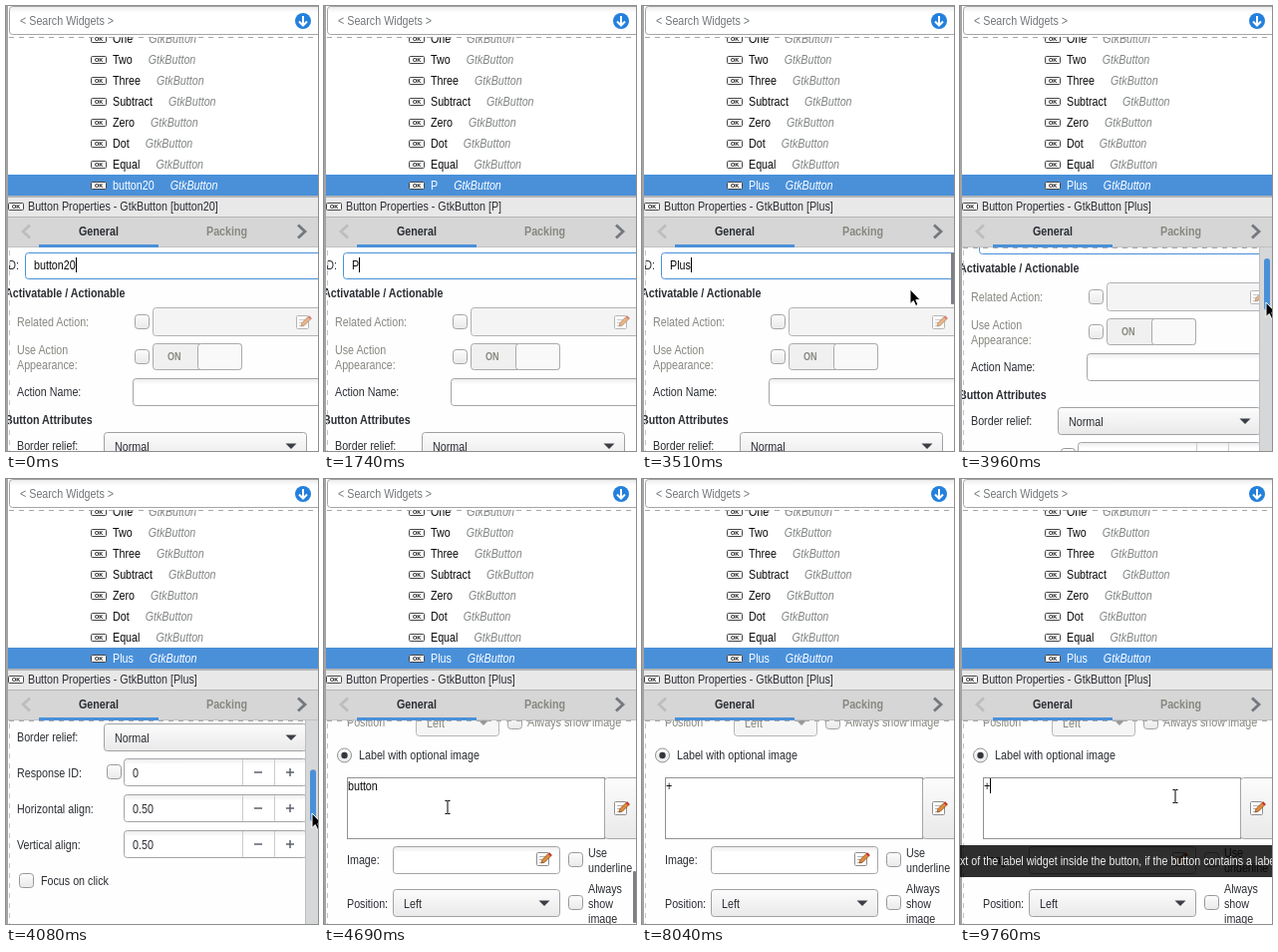
Write an HTML page that moves like this. It is 313x446 px and loops after 9.78 s.

```html
<!DOCTYPE html>
<html lang="en">
<head>
<meta charset="utf-8">
<title>Button properties</title>
<style>
html, body { margin: 0; width: 100%; height: 100%; overflow: hidden; background: #fff; }
svg { display: block; width: 100vw; height: 100vh; }
text { font: 13px "Liberation Sans", Arial, sans-serif; fill: #2b2e33; white-space: pre; }
.b { font-weight: bold; }
.dim { fill: #868880; }
.hint { fill: #73777a; }
.kind { font-style: italic; fill: #828586; }
.sel text, .sel .kind { fill: #fff; }
.ink { fill: #0a0a0a; }
</style>
</head>
<body>
<svg id="stage" viewBox="0 0 313 446"></svg>
<script>
const LOOP = 9780, SCROLL = 600, TRAVEL = 146, GRAB = 291;
const NARROW = 0.825; // one condensed face throughout
const BLUE = '#4a90d9', PAGE = '#fefefe', WELL = 'url(#well)';

const rect = (x, y, w, h, fill, more = '') =>
  `<rect x="${x}" y="${y}" width="${w}" height="${h}" fill="${fill}" ${more}/>`;
const box = (x, y, w, h, fill = WELL, line = '#a3a5a8', r = 3) =>
  rect(x + .5, y + .5, w - 1, h - 1, fill, `stroke="${line}" rx="${r}"`);
const path = (d, more) => `<path d="${d}" ${more}/>`;
const text = (x, y, s, cls = '', more = '') =>
  `<text class="${cls}" transform="translate(${x} ${y}) scale(${NARROW} 1)" ${more}>${s}</text>`;

const okIcon = (x, y) => box(x, y, 16, 8, '#fff', '#444', 1) +
  `<text x="${x + 8}" y="${y + 6}" text-anchor="middle" style="font-size:5.500px;font-weight:bold;fill:#111">OK</text>`;
const check = (x, y, off) => box(x, y, 15, 15, 'url(#face)', off ? '#a2a4a6' : '#96999c');
const down = (x, y, c = '#3b3f45') => path(`M${x - 5.5} ${y - 2.5}h11l-5.5 5.5z`, `fill="${c}"`);
const combo = (x, y, w, h, s, off) =>
  box(x, y, w, h, off ? '#f5f5f5' : 'url(#face)', off ? '#b4b6b8' : '#9fa1a4') +
  text(x + 11, y + h / 2 + 4.5, s, off ? 'dim' : '') + down(x + w - 16, y + h / 2, off ? '#999' : undefined);
const spin = (x, y, s) => box(x, y, 302 - x, 28) +
  path(`M237.5 ${y + 1}v26M269.5 ${y + 1}v26`, 'stroke="#c9cbcd"') + text(x + 9, y + 18.5, s) +
  path(`M249 ${y + 14}h8M281 ${y + 14}h8M285 ${y + 10}v8`, 'stroke="#5c616c" stroke-width="1.5"');
const radio = (y, s, on) =>
  `<circle cx="20.5" cy="${y}" r="7" fill="url(#face)" stroke="#8f9295"/>` +
  (on ? `<circle cx="20.5" cy="${y}" r="3.2" fill="#33363b"/>` : '') + text(35, y + 4, s);
const pencil = (x, y, alpha = 1) => `<g transform="translate(${x} ${y})" opacity="${alpha}">` +
  box(0, 1, 13, 14, '#fff', '#8d8d8d', 1) +
  path('M3 5.5h7M3 8.5h5M3 11.5h5', 'stroke="#b5b5b5"') +
  path('M5 12l1-3.5L12.500 2l2.500 2.500L8.500 11z', 'fill="#e08a3c" stroke="#8a4f1d" stroke-width=".8"') +
  path('M12.500 2l2.500 2.500', 'stroke="#c4302b" stroke-width="2"') + '</g>';
const dashes = (d, color, id = '') =>
  path(d, `id="${id}" stroke="${color}" stroke-dasharray="5 5" fill="none"`);

const row = (name, i, id = '') => {
  const y = 37 + 21 * i;
  return okIcon(85, y - 8) +
    text(107, y, `<tspan>${name}</tspan><tspan class="kind" dx="19.400">GtkButton</tspan>`, 'ink', `id="${id}"`);
};

const tree = rect(0, 0, 313, 191, '#fff') + box(3, 0, 318, 29) +
  text(14, 19, '&lt; Search Widgets &gt;', 'hint') +
  '<circle cx="298" cy="15" r="8" fill="#2380dc"/>' +
  path('M298 10v9M294 15.500l4 4l4-4', 'stroke="#fff" stroke-width="2" fill="none"') +
  '<g clip-path="url(#list)">' +
  ['One', 'Two', 'Three', 'Subtract', 'Zero', 'Dot', 'Equal'].map((n, i) => row(n, i)).join('') +
  rect(0, 169, 313, 21, BLUE) + `<g class="sel">${row('button20', 7, 'node')}</g></g>` +
  dashes('M3 31.5H313', '#a8a8a8');

const chevron = (x, turn, color) =>
  path(`M${x} 219.500l${7 * turn} 6.500l${-7 * turn} 6.500`, `stroke="${color}" stroke-width="2.800" fill="none"`);

const header = rect(0, 190, 313, 22, '#e8e8e8') + rect(0, 190, 313, 2, '#b3b4b6') + okIcon(2, 197) +
  text(22, 205, '', '', 'id="title"') +
  rect(0, 211, 313, 31, '#d6d6d6') + rect(0, 211, 313, 1, '#b4b5b7') + rect(0, 241, 313, 1, '#bfc0c2') +
  rect(33, 239, 120, 3, BLUE) +
  text(73, 230, 'General', 'b') + text(201, 230, 'Packing', 'b dim') +
  chevron(24, -1, '#bcbdbf') + chevron(293, 1, '#74787e');

const upper = text(-.7, 264, 'ID:') + box(19, 247, 310, 27, '#fff', BLUE) +
  text(28, 264, '', 'ink', 'id="entry"') + rect(0, 252, 1, 15, '#000', 'id="entryCaret"') +
  text(-1, 292, 'Activatable / Actionable', 'b') +
  text(11, 321, 'Related Action:', 'dim') + check(129, 309, 1) +
  box(147, 302, 180, 29, '#f4f4f4', '#b0b2b4') + pencil(291, 309, .6) +
  text(11, 349, 'Use Action', 'dim') + text(11, 364, 'Appearance:', 'dim') + check(129, 344, 1) +
  box(147, 338, 90, 27, '#f0f0f0', '#a8aaac') + box(192, 338, 45, 27, '#f9f9f9', '#a8aaac') +
  text(162, 355, 'ON', 'b dim', 'style="font-size:11px"') +
  text(11, 391, 'Action Name:') + box(127, 373, 200, 28) +
  text(-1, 419, 'Button Attributes', 'b') +
  text(11, 445, 'Border relief:') + combo(98, 427, 204, 28, 'Normal') +
  text(11, 481, 'Response ID:') + check(101, 468) + spin(118, 462, '0') +
  text(11, 517, 'Horizontal align:') + spin(118, 498, '0.50') +
  text(11, 553, 'Vertical align:') + spin(118, 534, '0.50') +
  check(13, 577) + text(35, 589, 'Focus on click') +
  text(-1, 640, 'Button Content', 'b') +
  radio(680, 'Add custom content') + radio(720, 'Stock Button') +
  text(23, 782, 'Stock:', 'dim') + combo(92, 764, 144, 28, 'None', 1);

const lower = `<g transform="translate(0 ${SCROLL})">` +
  text(23, 248, 'Position', 'dim') + combo(92, 230, 84, 28, 'Left', 1) +
  check(184, 236, 1) + text(204, 248, 'Always show image', 'dim') +
  radio(277, 'Label with optional image', 1) +
  box(23, 299, 259, 62, '#fff', '#909295', 0) + box(281, 299, 50, 62, 'url(#face)', '#a3a5a8') + pencil(291, 322) +
  rect(24, 300, 30.500, 15, BLUE, 'id="mark"') +
  text(24, 312, '', 'ink', 'id="label"') + rect(0, 300, 1, 15, '#000', 'id="labelCaret"') +
  text(23, 386, 'Image:') + box(69, 368, 168, 28) + pencil(213, 373) +
  check(245, 374) + text(265, 379, 'Use') + text(265, 394, 'underline') +
  text(23, 430, 'Position:') + combo(69, 411, 168, 28, 'Left') +
  check(245, 417) + text(265, 415, 'Always') + text(265, 430, 'show') + text(265, 445, 'image') + '</g>';

const beam = 'M-2.500 -6.500H-.5L0 -6L.5 -6.500H2.500M0 -6V6M-2.500 6.500H-.5L0 6L.5 6.500H2.500';
const overlay =
  `<g id="bar">${rect(300, 242, 13, 204, '#d6d7d8')}${rect(300, 242, 1, 204, '#bdbec0')}</g>` +
  rect(0, 0, 3, 52, '#7c7f83', 'id="thumb"') +
  rect(0, 0, 2, 446, '#a2a3a5') +
  `<g id="tip">${rect(0, 367, 313, 32, '#000', 'opacity=".82"')}` +
  text(-30.4, 387, 'The text of the label widget inside the button, if the button contains a label', '', 'style="fill:#eee"') + '</g>' +
  '<g id="beam" fill="none">' + path(beam, 'stroke="#fff" stroke-width="2.600"') +
  path(beam, 'stroke="#000"') + '</g>' +
  path('M0 0V14.500L3.300 11.500L5.600 16.500L8 15.400L5.800 10.600H10.200Z', 'id="arrow" fill="#000" stroke="#fff"');

document.getElementById('stage').innerHTML =
  `<defs>
    <clipPath id="list"><rect y="31" width="313" height="159"/></clipPath>
    <clipPath id="view"><rect y="242" width="313" height="204"/></clipPath>
    <linearGradient id="face" x2="0" y2="1"><stop stop-color="#fcfcfc"/><stop offset="1" stop-color="#e9e9ea"/></linearGradient>
    <linearGradient id="well" x2="0" y2="1"><stop stop-color="#ececec"/><stop offset=".22" stop-color="#fff"/></linearGradient>
  </defs>` + rect(0, 0, 313, 446, PAGE) + tree + header +
  `<g clip-path="url(#view)"><g id="page">${upper}${lower}</g>` +
  dashes('M3.5 245V446', '#c4c4c4') + dashes('M3 242.5H313', '#a8a8a8', 'edge') + '</g>' + overlay;

const el = id => document.getElementById(id);
const show = (id, on) => { el(id).style.display = on ? '' : 'none'; };
const set = (id, attrs) => { for (const k in attrs) el(id).setAttribute(k, attrs[k]); };
const write = (node, s) => { if (node.textContent !== s) node.textContent = s; };
const last = (list, t) => list.filter(k => k[0] <= t).pop()[1];

const names = [[0, 'button20'], [480, 'button2'], [980, 'button'], [1020, 'butto'], [1060, 'butt'],
  [1100, 'but'], [1140, 'b'], [1180, ''], [1740, 'P'], [1950, 'Pl'], [2160, 'Plu'], [2320, 'Plus']];
const labels = [[0, 'button'], [5790, ''], [6770, '+']];
// time, x, y of the pointer
const moves = [[2830, 124, 257], [2990, 131, 260], [3240, 190, 268], [3640, 307, GRAB], [3820, 307, GRAB],
  [3960, 307, GRAB + 6], [4400, 307, GRAB + TRAVEL], [4440, 307, GRAB + TRAVEL], [4690, 124, 329],
  [4790, 124, 329], [4870, 123, 330], [8900, 123, 330], [9300, 215.5, 317.5]];

function pointer(t) {
  const i = moves.findIndex(m => m[0] > t);
  if (i === 0) return moves[0].slice(1);
  if (i < 0) return moves[moves.length - 1].slice(1);
  const [a, b] = [moves[i - 1], moves[i]];
  const p = (t - a[0]) / (b[0] - a[0]);
  return [a[1] + (b[1] - a[1]) * p, a[2] + (b[2] - a[2]) * p];
}

const width = id => el(id).textContent ? el(id).getComputedTextLength() * NARROW : 0;

function draw(t) {
  const name = last(names, t);
  write(el('node').firstChild, name);
  write(el('title'), `Button Properties - GtkButton [${name}]`);
  write(el('entry'), name);
  set('entryCaret', { x: Math.round(28 + width('entry')) });

  const marked = t >= 5270 && t < 5790;
  write(el('label'), last(labels, t));
  el('label').style.fill = marked ? '#fff' : '';
  show('mark', marked);
  set('labelCaret', { x: Math.round(24 + width('label')) });
  const blink = (t >= 8040 && t < 8470) || (t >= 9300 && t < 9720);
  show('labelCaret', t >= 5150 && !marked && !blink);

  const from = [8900, 4790, 4690, 3820, 2830, 0].find(s => s <= t);
  const [x, y] = pointer(from + Math.floor((t - from) / 40) * 40 + (from === 3820 ? 20 * (t >= 3960) : 0));
  const drag = t >= 3820 && t < 4440;
  const scroll = t < 3820 ? 0 : drag ? Math.round((y - GRAB) * SCROLL / TRAVEL) : SCROLL;
  set('page', { transform: `translate(0 ${-scroll})` });
  show('edge', scroll > 0);

  const wide = drag || (t >= 2830 && t < 4500 && x >= 300);
  show('bar', wide);
  show('thumb', t >= 2830 && t < 6230);
  set('thumb', {
    x: wide ? 305 : 310, y: 247 + scroll * TRAVEL / SCROLL, width: wide ? 6 : 3, rx: wide ? 3 : 1,
    fill: drag ? BLUE : '#7c7f83'
  });

  const seen = (t >= 2830 && t < 6770) || t >= 8900;
  const typing = t < 3820 ? y < 273 && x < 300 : t >= 4440 && x < 281 && y < 361;
  show('beam', seen && typing);
  show('arrow', seen && !typing);
  set('beam', { transform: `translate(${Math.round(x)} ${Math.round(y)})` });
  set('arrow', { transform: `translate(${Math.round(x)} ${Math.round(y)})` });
  show('tip', t >= 9760);
}

const start = performance.now();
function tick() {
  draw((performance.now() - start) % LOOP);
  requestAnimationFrame(tick);
}
draw(0);
requestAnimationFrame(tick);
</script>
</body>
</html>
```
